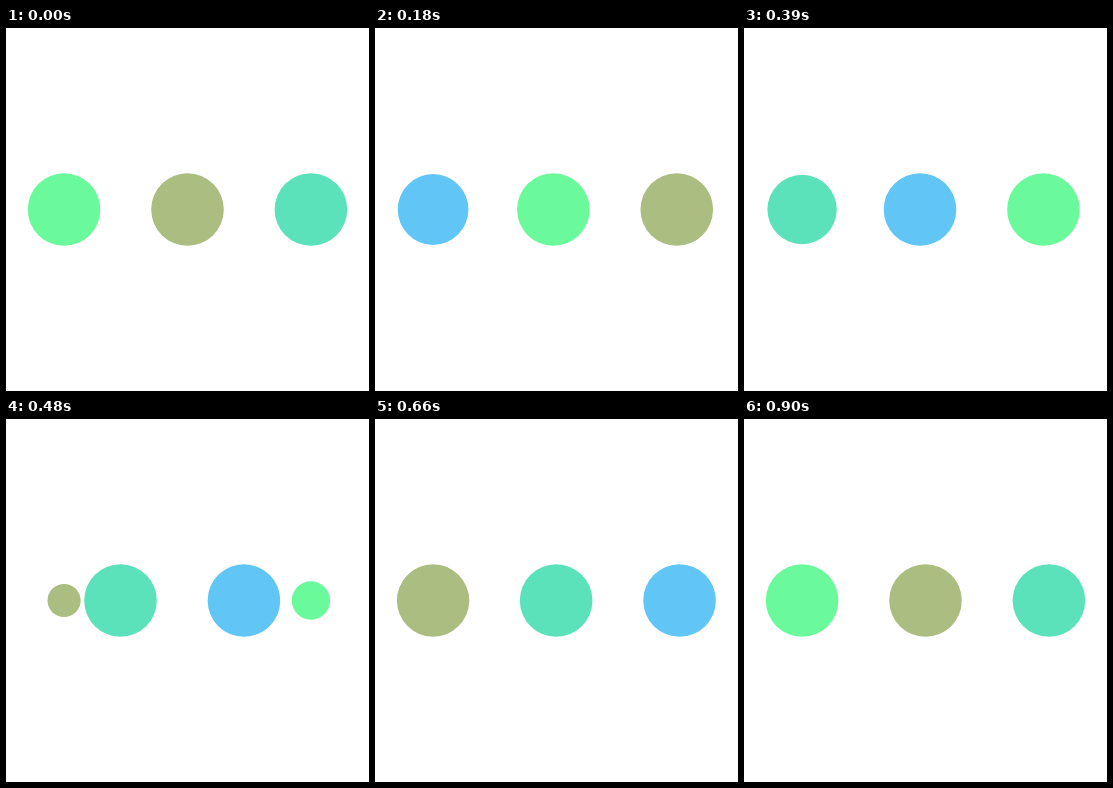
An HTML page with a canvas for the animation above (0.93 s loop, 363 px wide and 363 px high).

```html
<!DOCTYPE html>
<html lang="en">
<head>
<meta charset="utf-8">
<title>Sliding dots loader</title>
<style>
  html, body { margin: 0; width: 100%; height: 100%; overflow: hidden; background: #fff; }
  canvas { display: block; }
</style>
</head>
<body>
<canvas width="363" height="363"></canvas>
<script>
const ctx = document.querySelector('canvas').getContext('2d');
const STEP = 30, STEPS = 31, CYCLE = 30;
const UNIT = 3.63, RADIUS = 10, LEFT = 16, GAP = 34;
const COLORS = ['#5be2bb', '#61c6f6', '#6bfa9b', '#abbd81'];

// cubic-bezier(0, .5, .5, 1), solved with Newton steps to a loose tolerance
function ease(x, tolerance) {
  let s = x;
  for (let i = 0; i < 8; i++) {
    const error = 1.5 * s * s - 0.5 * s ** 3 - x;
    if (Math.abs(error) < tolerance) break;
    s -= error / (3 * s - 1.5 * s * s);
  }
  return 1.5 * s - 0.5 * s ** 3;
}

function dot(x, r, color) {
  ctx.fillStyle = color;
  ctx.beginPath();
  ctx.arc(x * UNIT, 50 * UNIT, r * UNIT, 0, 2 * Math.PI);
  ctx.fill();
}

function draw(time) {
  const step = Math.floor((time + 3) / STEP) % STEPS % CYCLE;
  const phase = step * 4 / CYCLE;
  const quarter = Math.floor(phase);
  const part = phase - quarter;
  const move = ease(part, 0.005);

  ctx.clearRect(0, 0, 363, 363);
  // The leaving dot shrinks at the right, beneath the others
  dot(LEFT + 2 * GAP, RADIUS * (1 - ease(part, 0.02)), COLORS[(4 - quarter) % 4]);
  COLORS.forEach((color, i) => {
    const stage = (i + quarter) % 4;  // 0 hidden, 1 growing, 2 and 3 sliding
    if (stage === 1) dot(LEFT, RADIUS * move, color);
    if (stage > 1) dot(LEFT + GAP * (stage - 2 + move), RADIUS, color);
  });
}

function loop() {
  draw(performance.now());
  requestAnimationFrame(loop);
}
loop();
</script>
</body>
</html>
```
